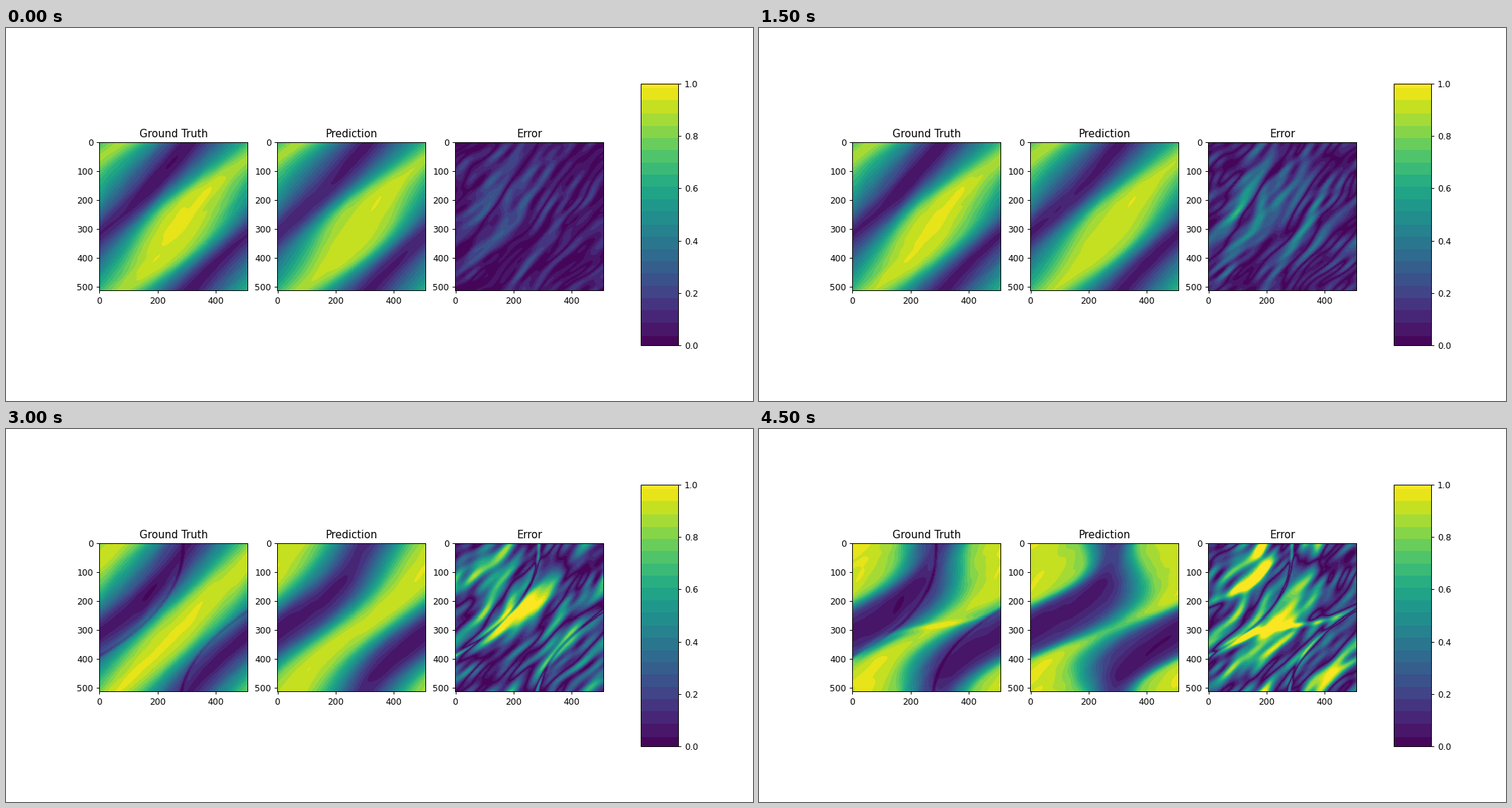
These frames come from a looping animation (1058x529 px, 5 s). A matplotlib script:

```python
import numpy as np
import matplotlib.pyplot as plt
from matplotlib.animation import FuncAnimation
from matplotlib.cm import ScalarMappable
from matplotlib.colors import ListedColormap

N = 210              # period of the square domain
STEPS = 10
LAST = STEPS - 1
MIRROR_S, MIRROR_V = 264, 34   # the flow is symmetric about a point
U = np.arange(N)[None, :] + 0.5
V = np.arange(N)[:, None] + 0.5
TURN = 2 * np.pi / N


def mix(a, b, e):
    return a + (b - a) * e


def polar(size, degrees):
    return size * np.exp(1j * np.radians(degrees))


def rising_edge(v, e, means, waves):
    """Place of an edge in u + v on each row, swaying as the flow rolls up."""
    return mix(*means, e) + (mix(*waves, e) * np.exp(-1j * TURN * v)).real


def edges_at(e):
    def low(v):
        return rising_edge(v, e, (154, 164), (polar(5, 90), polar(30, 160)))

    def high(v):
        return rising_edge(v, e, (208, 202), (polar(20, -14), polar(36, 150)))

    back = MIRROR_V - V
    return MIRROR_S - high(back), MIRROR_S - low(back), low(V), high(V)


def blur(field, sigma):
    f = np.fft.fftfreq(N)
    g = np.exp(-2 * (np.pi * sigma * f) ** 2)
    return np.fft.ifft2(np.fft.fft2(field) * g[:, None] * g).real


def bands(t):
    """A bright and a dark diagonal band that roll up over time."""
    e = min((t / LAST) ** 3, 1.3)
    f8, f2, r2, r8 = edges_at(e)
    widths = np.maximum([f8 + N - r8, f2 - f8, r2 - f2, r8 - r2], 5)
    a, b, c, d = widths * N / widths.sum(axis=0)
    x = (U + V - r8) % N
    top = .58 + .22 * np.clip(a / 28, 0, 1)
    crest = np.minimum(.0024 * a, .14)
    dip = np.clip(.0045 * (c - 15), 0, .15)
    field = np.select(
        [x < a, x < a + b, x < a + b + c],
        [top + crest * np.sin(np.pi * x / a),
         top - (top - .2) * (x - a) / b,
         .2 - dip * np.sin(np.pi * (x - a - b) / c)],
        .2 + (top - .2) * (x - a - b - c) / d)
    return blur(field, 3)


rng = np.random.default_rng(7)
MODES = 50
M = rng.integers(1, 12, MODES)
K = np.rint(M * rng.normal(.85, .3, MODES))
PHASE = rng.uniform(0, 2 * np.pi, MODES)
DRIFT = rng.normal(0, .2, MODES)


def streaks(t, shift=0):
    """Diagonal filaments of unit spread, slowly drifting."""
    u = U + 5 * np.sin(TURN * (V + 30)) + 2 * np.sin(TURN * (2 * V - U))
    v = V + 5 * np.sin(TURN * (U + 90)) + 2 * np.sin(TURN * (2 * U + V))
    total = sum(np.sin(TURN * (m * u + k * v) + p + shift * m + w * t) / m ** .8
                for m, k, p, w in zip(M, K, PHASE, DRIFT))
    return total / total.std()


def ridge(dist, slope, width):
    return np.exp(-dist ** 2 / (1 + slope ** 2) / width ** 2)


def dark_line(t):
    """Thin line bending away from the vertical, with its mirrored twin."""
    power = 2.3 + .12 * (t - 6)

    def arm(u, v):
        q = np.clip(v, 0, None) / 160
        slope = 118 / 160 * power * q ** (power - 1)
        return ridge(u - 118 + 118 * q ** power, slope, 2.3)

    v = MIRROR_V + N - V
    return np.maximum(arm(U, V), arm(MIRROR_S - MIRROR_V - U, v))


def bright_line():
    x = U - 118
    return ridge(V - 117 + .12 * x + 2.2e-5 * x ** 3,
                 .12 + 6.6e-5 * x ** 2, 4)


def panels_at(t):
    texture = streaks(t)
    truth = bands(t) + .014 * texture
    truth -= .13 * np.clip((t - 4) / 2, 0, 1) * dark_line(t)
    truth += .15 * np.clip((t - 6) / 3, 0, 1) * bright_line()
    # The prediction runs ahead of the truth and lacks its thin lines.
    guess = bands(1.25 * t) + .009 * streaks(t, 1.3)
    spread = mix(.12, .32, t / LAST)
    error = np.abs(3.8 * (truth - guess) * min(t / 4, 1)
                   + spread * streaks(t, .6))
    return np.clip(truth, .01, .98), np.clip(guess, .01, .98), error


# Viridis in flat steps
edges = .035 + .0475 * np.arange(21)
full = np.r_[0, edges, 1]
centres = (full[:-1] + full[1:]) / 2
steps = np.digitize(np.linspace(0, 1, 256), edges)
cmap = ListedColormap(plt.get_cmap("viridis")(centres[steps]))

plt.rcParams["font.family"] = "DejaVu Sans"
fig, axes = plt.subplots(1, 3, figsize=(12, 6), dpi=1058.01 / 12)
fig.subplots_adjust(right=.8)
images = []
for ax, title, field in zip(axes, ["Ground Truth", "Prediction", "Error"],
                            panels_at(0)):
    images.append(ax.imshow(field, cmap=cmap, vmin=0, vmax=1,
                            interpolation="nearest",
                            extent=(-.5, 511.5, 511.5, -.5)))
    ax.set_title(title)
bar = ScalarMappable(cmap=cmap)
bar.set_clim(0, 1)
fig.colorbar(bar, cax=fig.add_axes([.85, .15, .05, .7]))


def draw(i):
    for image, field in zip(images, panels_at(i)):
        image.set_data(field)
    return images


anim = FuncAnimation(fig, draw, frames=STEPS, interval=500, repeat=True,
                     repeat_delay=0, blit=False)
plt.show()
```
